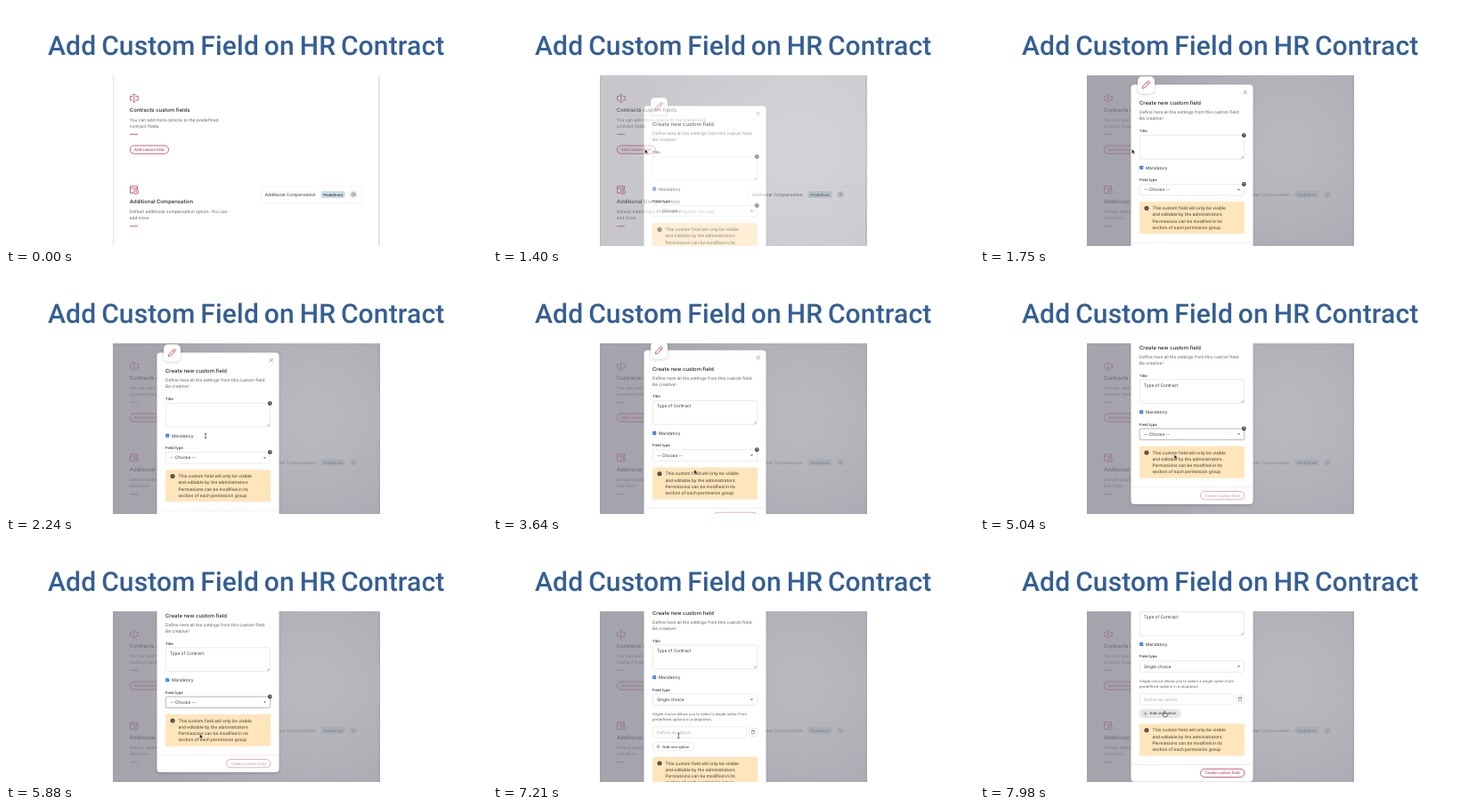
An HTML page for the animation above (8 s loop, 540 by 270 pixels).

```html
<!DOCTYPE html>
<html lang="en">
<head>
<meta charset="utf-8">
<title>Add Custom Field on HR Contract</title>
<style>
html, body { margin: 0; width: 100%; height: 100%; overflow: hidden; background: #fff; }
svg { display: block; width: 540px; height: 270px; }
text { font: 4.8px Inter, "Liberation Sans", sans-serif; fill: #5e5e67; text-rendering: geometricPrecision; white-space: pre; }
.title { font: 500 30px Roboto, Inter, sans-serif; fill: #355f94; letter-spacing: .15px; word-spacing: -1.8px; }
.head { font-size: 5.95px; font-weight: 500; fill: #24242c; }
.label { font-size: 4.2px; font-weight: 500; fill: #2b2b34; }
.small { font-size: 4.15px; }
.dark { fill: #303039; }
.faint { fill: #a9a9b0; }
.note { font-weight: 500; fill: #594c3b; }
.btn { font-size: 4.15px; font-weight: 500; fill: #b93757; text-anchor: middle; }
.red { fill: none; stroke: #bd3c5c; stroke-width: .8; }
.box { fill: #fff; stroke: #dedee3; stroke-width: .6; }
.line { fill: none; stroke: #77777f; stroke-width: .6; stroke-linecap: round; }
</style>
</head>
<body>
<svg viewBox="0 0 540 270">
  <defs>
    <clipPath id="screen"><rect x="120" y="78" width="300" height="192"/></clipPath>
    <radialGradient id="shade" gradientUnits="userSpaceOnUse" cx="345" cy="160" r="190">
      <stop offset="0" stop-color="#a3a2aa"/>
      <stop offset=".3" stop-color="#9d9ca5"/>
      <stop offset="1" stop-color="#878692"/>
    </radialGradient>
    <filter id="shadow" x="-30%" y="-30%" width="160%" height="160%">
      <feDropShadow dx="0" dy="1" stdDeviation="1.5" flood-color="#333" flood-opacity=".25"/>
    </filter>
    <g id="help">
      <circle r="2.4" fill="#4a4a52"/>
      <path d="M-.7-.5a.7.7 0 1 1 .7.8M0 1.2v.1" fill="none" stroke="#fff" stroke-width=".5"/>
    </g>
  </defs>

  <text class="title" x="47" y="54.500">Add Custom Field on HR Contract</text>

  <g clip-path="url(#screen)">
    <g id="page">
      <path d="M120.5 78V270" stroke="#e6e6e9"/>
      <path d="M418.8 78V270" stroke="#e0e0e3" stroke-width="1.600"/>

      <path class="red" d="M142 101.500H139.500V106H142M145.500 101.500H148.300V106H145.500M143.800 99.500V108M142.300 99.500H145.300M142.300 108H145.300"/>
      <text class="head" x="138.800" y="119.300">Contracts custom fields</text>
      <text x="138.800" y="129.700">You can add more options to the predefined</text>
      <text x="138.800" y="136.900">contract fields.</text>
      <path class="red" d="M139 144.300h9"/>
      <rect id="add" class="red" x="139.200" y="157" width="43.300" height="9.200" rx="4.600"/>
      <text class="btn" x="160.900" y="163.100">Add custom field</text>

      <path class="red" d="M143 210.500H139.500V202.700H147.500V206M139.500 205H147.500"/>
      <circle class="red" cx="146" cy="209" r="2.500"/>
      <path class="red" d="M146 207.700V209.200H147" stroke-width=".5"/>
      <text class="head" x="138.800" y="222.300">Additional Compensation</text>
      <text x="138.800" y="233">Default additional compensation option. You can</text>
      <text x="138.800" y="240.200">add more.</text>
      <path class="red" d="M139 247.700h9"/>

      <rect x="286.500" y="203" width="113" height="18.800" fill="none" stroke="#f2f2f4" stroke-width=".8"/>
      <text class="dark" x="290.800" y="213.900">Additional Compensation</text>
      <rect x="353.500" y="208.300" width="27" height="7.800" rx="2" fill="#c8dde3"/>
      <text class="btn" x="367" y="213.700" style="fill:#24343b">Predefined</text>
      <rect x="385.500" y="207.500" width="9" height="9" rx="2" fill="#f1f1f3"/>
      <circle class="line" cx="390" cy="212" r="2.300"/>
      <circle class="line" cx="390" cy="212" r=".8"/>
    </g>

    <g id="dialog">
      <rect x="120" y="78" width="300" height="192" fill="url(#shade)" opacity=".75"/>
      <g id="modal">
        <rect id="sheet" x="169.500" y="88.500" width="137" height="197" rx="4" fill="#fff" filter="url(#shadow)"/>
        <rect x="177" y="79.300" width="19" height="19" rx="5" fill="#fff" filter="url(#shadow)"/>
        <path class="red" d="M182.300 92.600l.6-2.400 5.500-5.500q.9-.6 1.700.2t.2 1.600l-5.500 5.500zM187.200 85.900l1.800 1.800"/>
        <path class="line" d="M296 95.300l3.600 3.600m0-3.600l-3.600 3.600"/>
        <text class="head" x="179" y="111.300">Create new custom field</text>
        <text x="179" y="121.300">Define here all the settings from this custom field.</text>
        <text x="179" y="128.400">Be creative!</text>

        <text class="label" x="179" y="142">Title</text>
        <rect class="box" x="179.200" y="145.300" width="117.500" height="26.800" rx="2"/>
        <path class="line" d="M293.500 171l2-2M295 171l.5-.5" stroke-width=".4"/>
        <text id="typed" class="dark" x="184" y="153"></text>
        <path id="caret" d="M0 148.800v5" stroke="#333" stroke-width=".5"/>
        <use id="titleHelp" href="#help" x="296.300" y="145.500"/>

        <rect x="179.200" y="179.700" width="4" height="4" rx=".8" fill="#2671df"/>
        <path d="M180.200 181.700l.8.8 1.300-1.600" fill="none" stroke="#fff" stroke-width=".6"/>
        <text class="dark" x="186" y="183.500">Mandatory</text>

        <text class="label" x="179" y="197">Field type</text>
        <rect id="select" class="box" x="179.200" y="200.500" width="117.500" height="12.600" rx="2"/>
        <text id="choice" class="dark" x="184" y="208.300"></text>
        <path d="M289 206h3l-1.500 1.800z" fill="#66666e"/>
        <use id="typeHelp" href="#help" x="296.300" y="200.500"/>

        <g id="extra">
          <text class="small" x="179" y="224.300">Single choice allows you to select a single option from</text>
          <text class="small" x="179" y="230.700">predefined options in a dropdown.</text>
          <rect class="box" x="179.200" y="237.300" width="105.200" height="12.400" rx="2"/>
          <text class="faint" x="184" y="245.400">Define an option...</text>
          <rect class="box" x="287.500" y="239" width="9" height="9" rx="2"/>
          <path class="line" d="M290 242h4M291.300 242v-.8h1.400v.8M290.500 242.200l.3 3.400h2.400l.3-3.400" stroke-width=".5"/>
          <rect id="pill" class="box" x="179.200" y="255" width="46.500" height="9.400" rx="4.700"/>
          <path class="line" d="M183.500 259.700h4M185.500 257.700v4" stroke-width=".5"/>
          <text class="btn" x="190.300" y="261.200" style="text-anchor:start;fill:#3f3f48">Add one option</text>
        </g>

        <g id="foot">
          <rect x="179" y="220.300" width="118" height="36" rx="1.500" fill="#fee5bc"/>
          <circle cx="187" cy="227.400" r="2.500" fill="#4a4034"/>
          <path d="M187 226v.5m0 .7v1.600" stroke="#fee5bc" stroke-width=".6"/>
          <text class="note" x="193.500" y="229.200">This custom field will only be visible</text>
          <text class="note" x="193.500" y="236.400">and editable by the administrators.</text>
          <text class="note" x="193.500" y="243.600">Permissions can be modified in its</text>
          <text class="note" x="193.500" y="250.800">section of each permission group</text>
          <path d="M169.500 266.200H306.500" stroke="#e9e9ec" stroke-width=".7"/>
          <g id="create">
            <rect class="red" x="247.500" y="271" width="49.300" height="9.300" rx="4.650"/>
            <text class="btn" x="272.100" y="277.200">Create custom field</text>
          </g>
        </g>
      </g>
    </g>

    <g id="cursor">
      <circle id="ring" cx="0" cy=".3" r="6.700" fill="none" stroke="#44444a" stroke-width=".9"/>
      <path id="arrow" d="M0 0V5.200L1.300 4.100 2.200 6.100 3.100 5.700 2.200 3.700H3.800Z" fill="#111" stroke="#fff" stroke-width=".4"/>
      <path id="beam" d="M-1.200-2.800Q0-2.800 0-2Q0-2.800 1.200-2.800M0-2.200V2.200M-1.200 2.800Q0 2.800 0 2Q0 2.800 1.200 2.800" fill="none" stroke="#33333a" stroke-width=".7"/>
      <path id="hand" d="M-.6-2.800q.6-.7 1.200 0V-.6l2 .5q.6.300.5 1L2.500 3H-.8L-2.600.6q.2-.8 1-.4l1 .7Z" fill="#fff" stroke="#222" stroke-width=".6"/>
    </g>
  </g>
</svg>
<script>
const LOOP = 8000, STEP = 70, GROW = 51;
const $ = id => document.getElementById(id);
const show = (id, on) => $(id).style.display = on ? "" : "none";
const move = (id, x, y) => $(id).setAttribute("transform", `translate(${x} ${y})`);
const mix = (a, b, u) => a + (b - a) * u;
const ramp = (t, a, b) => Math.min(1, Math.max(0, (t - a) / (b - a)));
const smooth = (t, a, b) => { const u = ramp(t, a, b); return u * u * (3 - 2 * u); };

// time, x, y of the pointer
const path = [
  [70, 215, 240], [770, 178, 190], [910, 178, 190], [1260, 170.5, 161],
  [1890, 170.5, 161], [2240, 224, 182], [2520, 232, 158], [3570, 232, 158],
  [3640, 226, 220], [4060, 226, 220], [4270, 219.3, 179], [4620, 219.3, 179],
  [5320, 217.5, 216], [6300, 217.5, 216], [6720, 208.3, 218], [7350, 208.3, 218],
  [7980, 207.2, 193.5]
];
// time, letters present in the title field
const typing = [[2660, 1], [2730, 2], [3150, 4], [3220, 7], [3360, 10], [3430, 13], [3500, 16]];

function pointerAt(t) {
  const i = path.findIndex(k => k[0] > t);
  if (i < 0) return path[path.length - 1].slice(1);
  if (i === 0) return path[0].slice(1);
  const a = path[i - 1], b = path[i], u = smooth(t, a[0], b[0]);
  return [mix(a[1], b[1], u), mix(a[2], b[2], u)];
}

function drawPointer(t) {
  const kind = t < 70 ? "" : t < 2100 ? "arrow" : t < 3150 ? "beam" : t < 3640 ? "" :
    t < 6500 ? "arrow" : t < 7600 ? "beam" : "hand";
  for (const id of ["arrow", "beam", "hand"]) show(id, id === kind);
  show("ring", t >= 4200 && t < 4410);
  move("cursor", ...pointerAt(t));
}

function draw(t) {
  const enter = ramp(t, 1400, 1680);
  const chosen = t >= 5950, grow = GROW * smooth(t, 5880, 6160);
  const scroll = 26.5 * smooth(t, 3570, 3920) + 40.2 * smooth(t, 7140, 7560);

  $("add").style.fill = t >= 1120 ? "#fbeef1" : "none";
  show("dialog", t >= 1400);
  $("dialog").style.opacity = mix(.62, 1, enter);
  move("modal", 0, 24 * (1 - enter) ** 2 - scroll);

  let letters = 0;
  for (const [at, n] of typing) if (t >= at) letters = n;
  $("typed").textContent = "Type of Contract".slice(0, letters);
  show("caret", t >= 2660 && t < 3640);
  move("caret", 184.5 + (letters ? $("typed").getComputedTextLength() : 0), 0);

  $("choice").textContent = chosen ? "Single choice" : "-- Choose --";
  $("select").style.stroke = t >= 4340 && t < 6300 ? "#85858d" : "";
  show("titleHelp", t < 3150);
  show("typeHelp", !chosen);
  show("extra", chosen);
  $("extra").style.opacity = ramp(t, 5880, 6160);
  $("pill").style.fill = t >= 7600 ? "#e7e7ea" : "";
  $("sheet").setAttribute("height", 197 + grow);
  move("foot", 0, grow);
  $("create").style.opacity = chosen ? 1 : .5;

  drawPointer(t);
}

const start = performance.now();
function tick() {
  const t = (performance.now() - start) % LOOP;
  draw(Math.floor(t / STEP) * STEP);
  requestAnimationFrame(tick);
}
tick();
</script>
</body>
</html>
```
